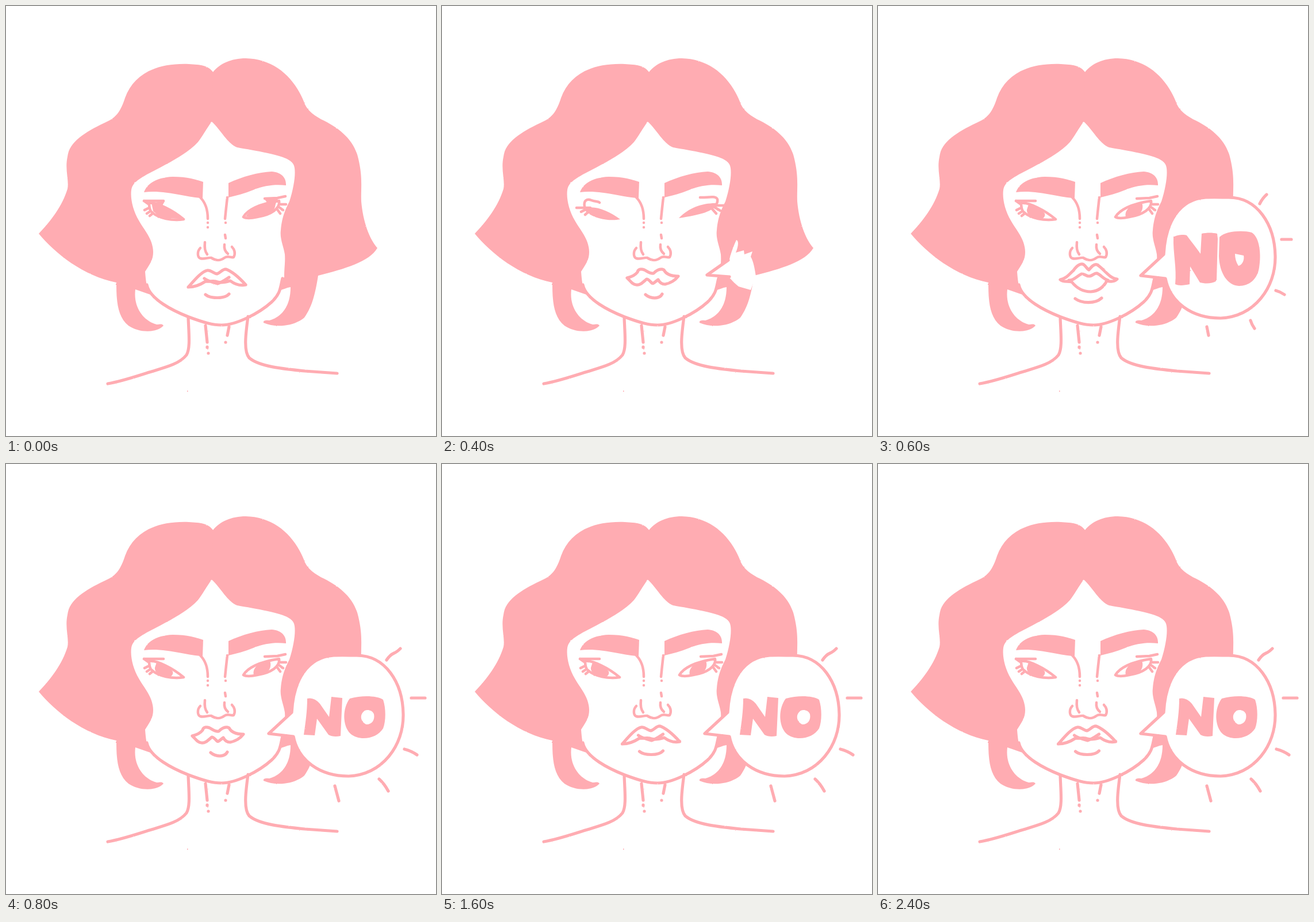
An HTML page for the animation above (2500 ms loop, 748x748 px).

```html
<!DOCTYPE html>
<html lang="en">
<head>
<meta charset="utf-8">
<title>No</title>
<style>
  html, body { margin: 0; width: 100%; height: 100%; overflow: hidden; background: #fff; }
  svg { display: block; width: 100%; height: 100%; }
  path { fill: none; }
  .line { stroke: #ffacb2; stroke-width: 5.2; stroke-linecap: round; stroke-linejoin: round; }
  .fine { stroke-width: 4.5; }
  .ink { fill: #ffacb2; }
  .paper { fill: #fff; }
  [data-part] { display: none; }
</style>
</head>
<body>
<svg viewBox="0 0 748 748">
  <filter id="rough" x="0" y="0" width="748" height="748" filterUnits="userSpaceOnUse" color-interpolation-filters="sRGB">
    <feTurbulence type="fractalNoise" baseFrequency=".22" numOctaves="2" seed="4"/>
    <feDisplacementMap in="SourceGraphic" scale="1.6" xChannelSelector="R" yChannelSelector="G"/>
  </filter>

  <g filter="url(#rough)">
    <!-- hair -->
    <path class="ink" d="M361 116C352 103 338 102 318 101C260 99 222 119 207 160C200 182 192 193 178 200C140 218 110 235 107 262C102 285 110 303 107 318C98 348 78 374 57 396C85 430 135 470 192 481C192 510 193 540 213 556C232 569 262 569 274 556C271 552 268 554 262 554C240 548 221 525 225 493C234 496 242 499 251 502C244 490 243 475 242 462C250 449 256 442 256 428C256 405 239 388 231 373C221 356 216 335 218 320C220 307 232 301 245 293C278 276 320 255 336 234C344 223 351 210 358 201L366 208V130Z"/>
    <path class="ink" d="M360 115C372 100 392 91 417 91C465 92 500 122 518 166C522 179 532 188 548 197C580 212 606 233 613 266C621 300 617 318 618 340C621 375 632 405 646 421C632 445 590 457 543 469C538 500 533 522 519 542C500 558 468 560 448 551C447 547 452 546 458 547C480 541 495 522 495 489C488 490 482 493 476 495C477 487 478 480 480 474L484 472C484 455 486 445 485 432C483 418 476 405 478 390C480 365 488 350 493 340C500 318 504 295 502 282C501 270 488 264 468 259C440 252 412 248 402 246C385 239 373 215 358 201Z"/>

    <!-- jaw, neck, shoulders -->
    <path class="line" d="M245 485C250 510 290 530 318 541C345 551 360 555 375 555C400 555 440 535 462 515C478 500 477 490 481 474M317 542C318 570 321 595 314 607C300 625 270 630 240 640C215 648 195 654 177 657M421 540C417 570 413 600 423 612C440 627 480 631 520 635L576 639M347 556L350 585M350 593v1M352 604h0M388 558L385 573M382 585h0"/>

    <!-- brows and nose -->
    <path class="ink" d="M240 324C246 307 265 298 290 297C315 297 332 302 343 306L342 334C318 334 275 319 240 324ZM387 308C410 297 440 289 462 288C478 289 488 298 487 312C468 310 450 312 430 320C415 326 400 330 387 333Z"/>
    <path class="line fine" d="M338 333C348 343 351 355 351 370M351 377h0M351 385h0M385 333C383 350 382 360 381 370M382 377h0M381 398L382 404M380 415C379 422 381 427 386 431M346 411C345 420 346 427 350 432M338 421C332 427 333 437 338 439C345 441 352 437 357 438C365 443 372 444 380 438C386 434 390 438 396 437C400 430 397 423 393 419"/>

    <!-- eyes -->
    <g data-part="open half">
      <path class="line fine" d="M249 343C262 341 290 355 309 371C290 374 265 370 252 357C249 352 249 347 249 343ZM240 339H274M240 339L247 344M247 352L241 355M251 357L245 361M255 361L250 365M413 367C420 355 440 344 475 339C477 352 462 363 437 367C428 369 418 370 413 367ZM450 335L472 334L486 331M476 345H487M475 350L482 355M472 354L477 361"/>
      <path class="ink" d="M262 345C275 347 286 354 290 361C292 366 287 371 281 371C268 369 258 363 259 354ZM440 349L459 342C462 350 460 359 452 363L431 367C429 360 433 352 440 349Z"/>
    </g>
    <path data-part="half" class="ink" d="M253 342L276 340L272 347C285 352 297 361 306 370C285 371 265 365 256 357ZM449 335L473 335L472 340C466 344 472 352 460 359C445 366 425 369 417 366C424 355 438 347 455 343Z"/>
    <g data-part="shut">
      <path class="ink" d="M249 352C265 346 290 356 310 371C290 375 262 369 250 357ZM412 369C430 350 455 342 479 343C472 358 450 363 412 369Z"/>
      <path class="line fine" d="M234 351H258M242 358L250 354M249 363L257 356M248 349C246 338 252 335 260 338C267 341 272 339 274 342M470 347H493M474 350L484 356M470 353L477 361M449 333C460 334 475 329 479 336C480 341 478 344 476 346"/>
    </g>

    <!-- mouths -->
    <path id="frown" data-part="frown" class="line" d="M317 489C327 478 340 462 350 460C356 459 361 465 367 466C373 464 377 457 383 458C396 463 408 475 417 485C408 487 398 484 390 478C383 480 376 482 368 480C362 477 355 480 347 479C338 485 328 489 317 489ZM345 474C352 479 360 481 368 483C375 481 382 476 388 472M347 502C355 509 380 510 388 501"/>
    <path id="purse" data-part="purse" class="line" d="M322 473C332 470 336 468 340 463C341 457 347 457 352 459C358 462 362 466 368 465C374 459 380 456 386 459C390 467 400 470 411 470C405 478 397 482 388 484C382 484 378 480 376 476C370 480 368 484 365 482C361 478 359 475 356 475C350 480 345 486 338 485C330 484 328 478 322 473ZM354 502C362 509 378 511 383 501"/>
    <path data-part="speak" class="line" d="M317 476C328 474 333 466 340 460C346 451 353 447 358 450C362 453 364 458 367 459C371 454 376 448 381 450C392 456 402 474 416 475C412 479 405 480 398 478C393 488 385 496 370 497C355 497 345 490 337 480C330 478 322 481 317 476ZM332 477C340 478 346 470 354 466C360 466 362 470 367 470C373 470 376 464 381 465C388 468 392 475 400 477M343 509C355 518 378 518 389 508"/>

    <!-- speech -->
    <g data-part="burst">
      <path class="paper" d="M461 468L500 441C502 432 506 420 512 407C517 408 515 420 511 429L525 425L526 432L540 427L537 436C542 445 544 457 546 470L537 494L516 488C508 482 502 474 498 471Z"/>
      <path class="line" d="M498 442L461 468L500 471"/>
    </g>
    <g id="bubble" data-part="bubble">
      <path class="line paper" d="M497 432L457 469L500 474C508 515 545 543 596 543C655 540 692 490 691 435C690 380 660 333 610 333C600 333 585 332 570 333C525 336 500 375 497 432Z"/>
      <g data-part="big">
        <path class="ink" d="M514 402C520 398 532 397 537 399C546 411 554 421 561 431L563 396C572 394 582 394 590 396L591 405L589 478C580 484 568 483 560 481L543 453L542 484C533 486 523 487 517 484C520 455 513 430 514 402Z"/>
        <path class="ink" fill-rule="evenodd" d="M594 402C605 391 635 390 650 394C664 402 667 432 663 455C660 476 645 487 628 487C608 486 594 465 593 435ZM621 431L636 434C638 442 633 451 627 452C623 446 621 439 621 431Z"/>
      </g>
      <g data-part="small">
        <path class="ink" d="M524 408C532 406 540 410 546 417L562 440L566 405L585 407L582 473C574 475 566 474 561 471L541 443L537 472L518 471C521 450 524 430 524 408Z"/>
        <path class="ink" fill-rule="evenodd" d="M598 408C620 402 645 403 656 410C661 425 661 447 656 460C645 478 615 483 599 469C585 455 585 425 598 408ZM624 429C614 436 617 449 627 453C637 453 642 445 640 435C637 428 629 427 624 429Z"/>
      </g>
    </g>
    <path data-part="short" class="line" d="M664 344Q669 334 676 328M702 406H719M692 495Q700 497 707 502M648 547Q650 554 655 561M572 558L575 573"/>
    <path data-part="long" class="line" d="M662 341Q668 332 675 329Q680 327 686 321M705 407H729M693 496Q705 499 715 506M649 548Q658 556 665 569M572 560L579 586"/>
  </g>
  <path class="ink" d="M315 669h1.5v2h-1.5z"/>
</svg>
<script>
  const STEP = 100, LOOP = 2500;
  // One pose per step; the last one holds until the loop restarts.
  const poses = [
    'half frown',
    'shut frown',
    'shut frown',
    'shut purse',
    'shut purse burst',
    'half speak bubble big',
    'open speak bubble big short',
    'open speak bubble small long',
    'open purse bubble small long',
    'open purse bubble small long',
    'open frown bubble small long'
  ];
  const parts = [...document.querySelectorAll('[data-part]')];
  const move = (id, value) => document.getElementById(id).setAttribute('transform', value);
  let shown = -1;

  function draw(now) {
    const step = Math.floor(now % LOOP / STEP);
    if (step !== shown) {
      shown = step;
      const pose = poses[Math.min(step, poses.length - 1)].split(' ');
      for (const part of parts) {
        const visible = part.dataset.part.split(' ').some(name => pose.includes(name));
        part.style.display = visible ? 'inline' : 'none';
      }
      move('frown', step > 5 ? 'translate(-3.5 -2)' : '');
      move('purse', step > 5 ? 'translate(2 0)' : '');
      move('bubble', step === 5 ? 'translate(457 469) scale(.8) translate(-457 -469)' : '');
    }
    requestAnimationFrame(draw);
  }
  draw(performance.now());
</script>
</body>
</html>
```
